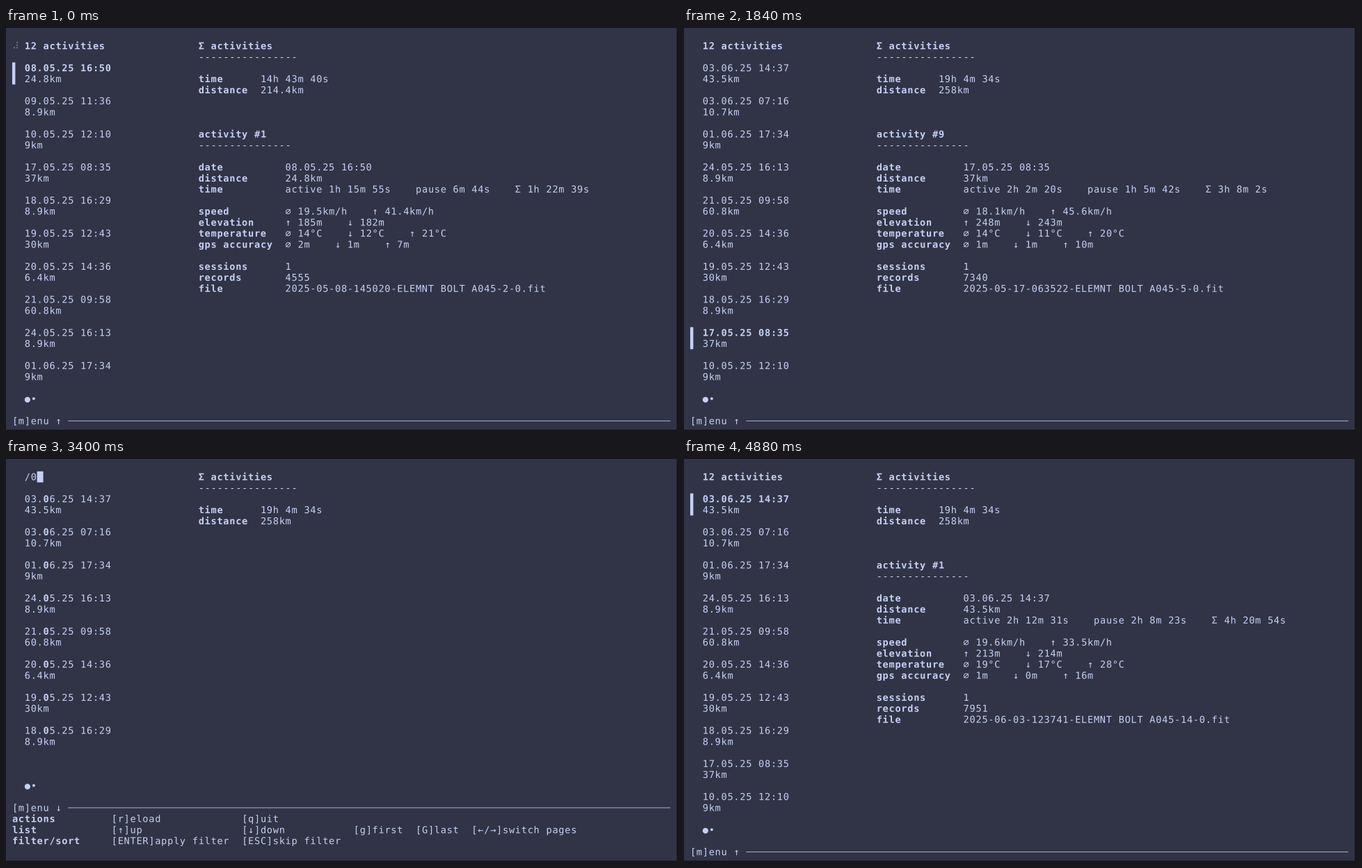
Recreate the animation shown at these times as an HTML page. Size 966x580 px, loop 4920 ms.

```html
<!DOCTYPE html>
<html lang="en">
<head>
<meta charset="utf-8">
<title>Activities</title>
<style>
  html, body { margin: 0; width: 100%; height: 100%; overflow: hidden; background: #17181f; }
  #term {
    position: absolute; left: 0; top: 0; width: 964px; height: 578px;
    background: #303446; color: #c6d0f5;
    font: 13.65px/15.875px "DejaVu Sans Mono", "DejaVu Sans", monospace;
    letter-spacing: .707px; font-variant-ligatures: none;
  }
  #term span, #term i { position: absolute; left: 0; top: 0; white-space: pre; }
  #term i { width: 1px; height: 1px; background: #c6d0f5; transform-origin: 0 0; }
  .b { font-weight: bold; }
  .dim { color: #77726f; }
</style>
</head>
<body>
<div id="term"></div>
<script>
const LOOP = 4920, CW = 8.925, RH = 15.875;
const CELL_TOP = 1.9, TEXT_TOP = 2.55;
const term = document.getElementById('term');

// date | km | active | pause | total | speed | climb | temperature | gps | records | seconds | file no.
const newest = `
03.06.25 14:37|43.5|2h 12m 31s|2h 8m 23s|4h 20m 54s|19.6 33.5|213 214|19 17 28|1 0 16|7951|41|14
03.06.25 07:16|10.7|34m 25s|4m 39s|39m 4s|18.7 27.4|85 82|11 10 21|1 0 16|2065|25|13
01.06.25 17:34|9|32m 28s|33|33m 1s|16.6 27.9|55 54|18 17 23|1 1 5|1948|19|12
24.05.25 16:13|8.9|30m 2s|3m 10s|33m 12s|17.8 29.6|52 50|16 15 22|1 1 6|1802|37|11
21.05.25 09:58|60.8|3h 20m 18s|58m 53s|4h 19m 11s|18.2 66.3|379 366|13 11 19|1 1 11|12018|55|9
20.05.25 14:36|6.4|21m 40s|3m 10s|24m 50s|17.7 31.2|41 43|19 17 24|1 1 8|1300|14|8
19.05.25 12:43|30|1h 35m 28s|26m 12s|2h 1m 40s|18.9 42.7|196 191|17 15 23|1 1 9|5728|48|7
18.05.25 16:29|8.9|30m 33s|3m 32s|34m 5s|17.5 28.8|50 48|16 15 21|2 1 12|1833|31|6
17.05.25 08:35|37|2h 2m 20s|1h 5m 42s|3h 8m 2s|18.1 45.6|248 243|14 11 20|1 1 10|7340|22|5
10.05.25 12:10|9|30m 51s|4m 19s|35m 10s|17.5 30.1|53 51|18 16 24|2 1 14|1851|05|4
09.05.25 11:36|8.9|29m 53s|2m 53s|32m 46s|18.0 29.2|49 47|18 16 25|2 1 100|1793|09|3
08.05.25 16:50|24.8|1h 15m 55s|6m 44s|1h 22m 39s|19.5 41.4|185 182|14 12 21|2 1 7|4555|20|2
`.trim().split('\n').map(line => {
  const [date, km, active, pause, total, speed, climb, temp, gps, records, sec, no] = line.split('|');
  return { date, km, active, pause, total, speed, climb, temp, gps, records, sec, no };
});
const oldest = [...newest].reverse();
const longest = [...newest].sort((a, b) => b.km - a.km);

// Positions of the query's characters in a date, or null
function hits(date, query) {
  const found = [];
  let from = 3;
  for (const c of query) {
    const at = date.indexOf(c, from);
    if (at < 0) return null;
    found.push(at);
    from = at + 1;
  }
  return found;
}
const matching = query => newest.filter(a => hits(a.date, query));

const all = ['19h 4m 34s', '258km'];
const steps = [
  [0, { list: oldest, sel: 0, sum: ['14h 43m 40s', '214.4km'], busy: true, menu: false, query: '', typing: false }],
  [40, { sum: all, busy: false }],
  [480, { list: longest }],
  [1000, { list: newest }],
  // down to the last entry
  ...[1480, 1520, 1560, 1640, 1680, 1720, 1760, 1840, 1880].map((t, i) => [t, { sel: i + 1 }]),
  [1960, { sel: 11 }],
  // and back up: one key every 50 ms, seen on a 40 ms clock
  ...Array.from({ length: 11 }, (_, i) => [2280 + 40 * Math.ceil(i * 1.25), { sel: 10 - i }]),
  [3120, { menu: true }],
  [3200, { typing: true, sel: -1 }],
  [3400, { query: '0' }],
  [3480, { query: '06', list: matching('06') }],
  [3520, { query: '06.', list: matching('06.') }],
  [3760, { typing: false, sel: 0, sum: ['5h 32m 59s', '63.3km'] }],
  [3800, { menu: false }],
  [4280, { sel: 1 }],
  [4360, { sel: 2 }],
  [4520, { sel: 1 }],
  [4560, { sel: 0 }],
  [4880, { list: newest, query: '', sum: all }],
];
let last = {};
const states = steps.map(([at, change]) => (last = { ...last, ...change, at }));

function put(col, row, text, cls = '') {
  for (const m of text.matchAll(/\S+/g)) {
    const el = document.createElement('span');
    const x = (col + m.index) * CW, y = TEXT_TOP + row * RH;
    el.className = cls;
    el.textContent = m[0];
    // the slight turn keeps baselines from snapping to whole pixels
    el.style.transform = `translate(${x}px, ${y}px) rotate(.05deg)`;
    term.append(el);
  }
}
const bold = (col, row, text) => put(col, row, text, 'b');

// Filled box in cell units, with soft edges between pixels
function block(col, row, w, h) {
  const el = document.createElement('i');
  el.style.transform =
    `translate(${col * CW}px, ${CELL_TOP + row * RH}px) scale(${w * CW}, ${h * RH})`;
  term.append(el);
}

function title(row, text) {
  bold(31, row, text);
  put(31, row + 1, '-'.repeat(text.length + 4));
}

// Pairs each value with its sign: "⌀ 14°C    ↓ 12°C"
const signed = (signs, values, unit) =>
  values.split(' ').map((v, i) => `${signs[i]} ${v}${unit}`).join('    ');

function fileName(a) {
  const [d, m, y, h, min] = a.date.split(/[. :]/);
  const utc = String(h - 2).padStart(2, '0');
  return `20${y}-${m}-${d}-${utc}${min}${a.sec}-ELEMNT BOLT A045-${a.no}-0.fit`;
}

function drawDetails(a, n) {
  title(9, 'activity #' + n);
  const rows = [
    [12, 'date', a.date],
    [13, 'distance', a.km + 'km'],
    [14, 'time', `active ${a.active}    pause ${a.pause}    Σ ${a.total}`],
    [16, 'speed', signed('⌀↑', a.speed, 'km/h')],
    [17, 'elevation', signed('↑↓', a.climb, 'm')],
    [18, 'temperature', signed('⌀↓↑', a.temp, '°C')],
    [19, 'gps accuracy', signed('⌀↓↑', a.gps, 'm')],
    [21, 'sessions', '1'],
    [22, 'records', a.records],
    [23, 'file', fileName(a)],
  ];
  for (const [row, label, value] of rows) {
    bold(31, row, label);
    put(45, row, value);
  }
}

function drawList(s) {
  const size = s.menu ? 8 : 10;
  const page = Math.floor(Math.max(s.sel, 0) / size);
  const pages = Math.ceil(s.list.length / size);

  s.list.slice(page * size, (page + 1) * size).forEach((a, i) => {
    const row = 3 + 3 * i;
    if (page * size + i === s.sel) {
      block(1, row, .5, 2);
      bold(3, row, a.date);
    } else if (s.query) {
      const marked = hits(a.date, s.query);
      [...a.date].forEach((c, k) => put(3 + k, row, c, marked.includes(k) ? 'b' : ''));
    } else {
      put(3, row, a.date);
    }
    put(3, row + 1, a.km + 'km');
  });

  if (pages > 1) {
    for (let p = 0; p < pages; p++) put(3 + p, s.menu ? 29 : 33, p === page ? '●' : '•');
  }
}

function drawMenu(s) {
  const row = s.menu ? 31 : 35;
  put(1, row, '[m]enu ' + (s.menu ? '↓' : '↑'));
  block(10, row + .475, 97, .05);
  if (!s.menu) return;
  const cols = [17, 38, 56, 66, 75];
  const filter = s.typing ? ['[ENTER]apply filter', '[ESC]skip filter']
    : ['[/]filter', '[ESC]clear filter'];
  [
    ['actions', '[r]eload', '[q]uit'],
    ['list', '[↑]up', '[↓]down', '[g]first', '[G]last', '[←/→]switch pages'],
    ['filter/sort', ...filter],
  ].forEach(([label, ...keys], i) => {
    bold(1, row + 1 + i, label);
    keys.forEach((key, k) => put(cols[k], row + 1 + i, key));
  });
}

function draw(s) {
  term.textContent = '';
  if (s.busy) put(1, 1, '⠼', 'dim');
  if (s.typing) {
    put(3, 1, '/' + s.query);
    block(4 + s.query.length, 1, 1, 1);
  } else {
    bold(3, 1, (s.query ? s.list.length + '/' : '') + '12 activities');
  }
  title(1, 'Σ activities');
  bold(31, 4, 'time');
  bold(31, 5, 'distance');
  put(41, 4, s.sum[0]);
  put(41, 5, s.sum[1]);
  drawList(s);
  if (s.sel >= 0) drawDetails(s.list[s.sel], s.sel + 1);
  drawMenu(s);
}

const start = performance.now();
let shown = null;
function tick() {
  const t = (performance.now() - start) % LOOP;
  const state = states.findLast(s => s.at <= t);
  if (state !== shown) draw(shown = state);
  requestAnimationFrame(tick);
}
tick();
</script>
</body>
</html>
```
